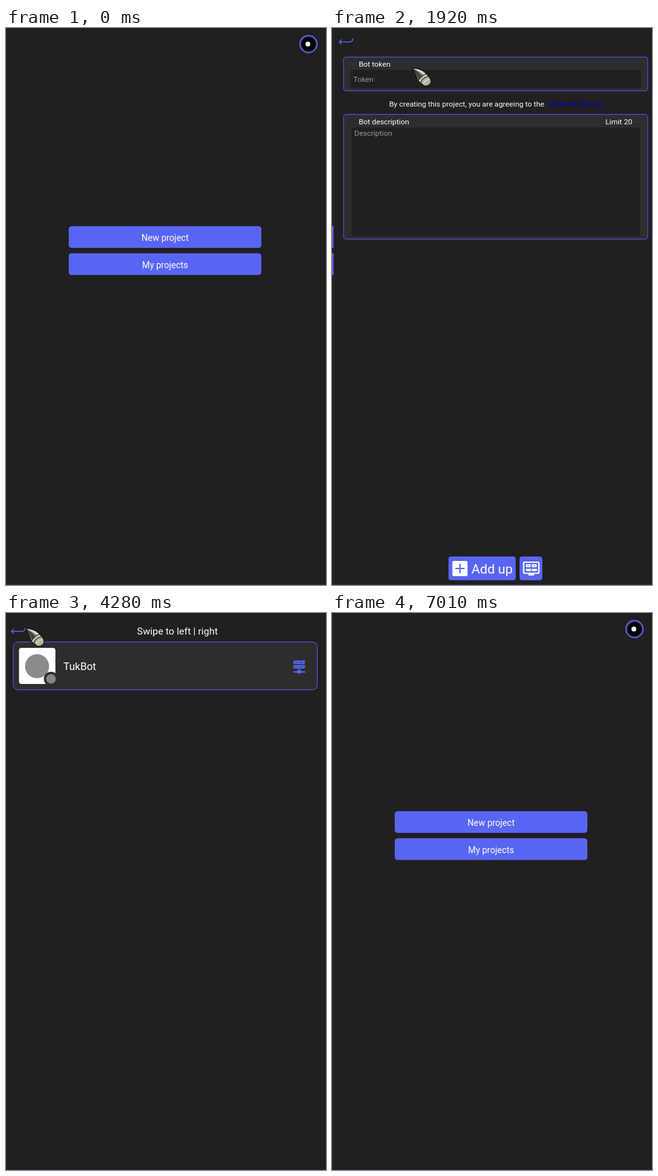
Recreate the animation shown at these times as an HTML page with a canvas. Size 505 by 879 pixels, loop 7270 ms.

```html
<!DOCTYPE html>
<html lang="en">
<head>
<meta charset="utf-8">
<title>Bot projects</title>
<style>
html, body { margin: 0; width: 100%; height: 100%; overflow: hidden; background: #211f20; }
canvas { display: block; width: 505px; height: 879px; }
</style>
</head>
<body>
<canvas id="stage"></canvas>
<script>
const W = 505, H = 879, LOOP = 7270, STEP = 1000 / 15;
const BG = '#211f20', BLUE = '#5865f2', CARD = '#2d2d2d', EDGE = '#4d55cc';
const canvas = document.getElementById('stage');
const ctx = canvas.getContext('2d');
const dpr = window.devicePixelRatio || 1;
canvas.width = W * dpr;
canvas.height = H * dpr;

// time, x, y of the pointer tip
const PATH = [
  [330, 495, 819], [540, 486, 350], [740, 462, 5], [1030, 323, 288],
  [1250, 312, 325], [1510, 312, 325], [1913, 127, 63], [2250, 18, 19],
  [2500, 18, 19], [3110, 236, 357], [3450, 236, 357], [4150, 31, 24],
  [4410, 31, 24], [4540, 17, 26], [4680, 17, 26], [5420, 471, 21],
  [5600, 471, 21], [6040, 479, 40], [6380, 479, 40], [7000, 503, 879]
];

const clamp = v => Math.max(0, Math.min(1, v));
const ramp = (t, start, len) => clamp((t - start) / len);
const smooth = k => k * k * (3 - 2 * k);
const bez = (s, a, b) => 3 * (1 - s) * (1 - s) * s * a + 3 * (1 - s) * s * s * b + s * s * s;

function slideEase(k) {
  if (k <= 0 || k >= 1) return clamp(k);
  let lo = 0, hi = 1;
  for (let i = 0; i < 24; i++) {
    const mid = (lo + hi) / 2;
    if (bez(mid, 0.35, 0.33) < k) lo = mid; else hi = mid;
  }
  return bez(lo, 0.91, 0.97);
}

const shown = (t, open, close) => slideEase(ramp(t, open, 500)) - slideEase(ramp(t, close, 500));
const pressAlpha = (t, down, up) => 1 - 0.8 * (ramp(t, down, 120) - ramp(t, up, 180));

function box(x, y, w, h, r, fill, stroke) {
  ctx.beginPath();
  ctx.roundRect(x, y, w, h, r);
  if (fill) { ctx.fillStyle = fill; ctx.fill(); }
  if (stroke) { ctx.strokeStyle = stroke; ctx.lineWidth = 1.2; ctx.stroke(); }
}

function disc(x, y, r, fill) {
  ctx.beginPath();
  ctx.arc(x, y, r, 0, 7);
  ctx.fillStyle = fill;
  ctx.fill();
}

function text(str, x, y, size, color = '#fff', align = 'left') {
  ctx.font = size + 'px Roboto, sans-serif';
  ctx.textAlign = align;
  ctx.fillStyle = color;
  ctx.fillText(str, x, y);
}

function shape(d, fill) {
  ctx.fillStyle = fill;
  ctx.fill(new Path2D(d));
}

function line(d, color, width) {
  ctx.strokeStyle = color;
  ctx.lineWidth = width;
  ctx.lineCap = ctx.lineJoin = 'round';
  ctx.stroke(new Path2D(d));
}

function at(x, y, draw) {
  ctx.save();
  ctx.translate(x, y);
  draw();
  ctx.restore();
}

function button(label, y, baseline, alpha) {
  ctx.save();
  ctx.globalAlpha *= alpha;
  box(99, y, 304, 34.3, 4.5, BLUE);
  text(label, 251, baseline, 14, '#fff', 'center');
  ctx.restore();
}

function avatar(x, y, ring) {
  disc(x, y, 13.5, ring ? '#1c1b1c' : '#2a2b2d');
  disc(x, y, 10.5, '#000');
  disc(x - 1, y, 3.8, '#f4f4f4');
  if (!ring) return;
  ctx.beginPath();
  ctx.arc(x, y, 13.4, 0, 7);
  ctx.strokeStyle = BLUE;
  ctx.lineWidth = 2;
  ctx.stroke();
}

const backArrow = (x, y) => at(x, y, () =>
  line('M4 -3.5L0.8 0L4 3.5M1 0H16Q22 0 22 -5', BLUE, 1.6));

function home(t, shift) {
  at(-shift, 0, () => {
    button('New project', 312.8, 336, pressAlpha(t, 1250, 1510));
    button('My projects', 355.4, 378.5, pressAlpha(t, 3130, 3360));
    avatar(477.4, 25.4, t < 5440 || t > 6440);
  });
}

function page(x, draw) {
  if (x > W + 2) return;
  at(x, 0, () => {
    ctx.fillStyle = BG;
    ctx.fillRect(-3, 0, W + 3, H);
    if (x > 0.5) {
      ctx.fillStyle = '#302e30';
      ctx.fillRect(-3.5, 0, 1, H);
    }
    draw();
  });
}

function newProject() {
  backArrow(5, 22);
  box(12.4, 45.8, 480, 53.4, 4, CARD, EDGE);
  text('Bot token', 36.3, 61.3, 11.8);
  box(23, 66, 459, 29, 4, BG);
  text('Token', 27.8, 85, 11.8, '#999');
  text('By creating this project, you are agreeing to the', 84.3, 124.3, 11.8);
  text('Terms of Service', 333, 124.3, 11.8, '#0000d8');
  box(12.4, 136.4, 480, 196.8, 4, CARD, EDGE);
  text('Bot description', 36.3, 152, 11.8);
  text('Limit 20', 468, 152, 11.8, '#fff', 'right');
  box(25, 157, 455, 172, 4, BG);
  text('Description', 29.3, 170.2, 11.8, '#999');

  box(178, 834, 106, 37.5, 4, BLUE);
  box(184, 841, 24, 24, 2, '#fff');
  line('M196 846.5V859.5M189.5 853H202.5', BLUE, 2);
  text('Add up', 214, 861, 20.8);
  box(290, 834, 36, 37.5, 4, BLUE);
  ctx.strokeStyle = '#fff';
  ctx.lineWidth = 2.2;
  ctx.beginPath();
  ctx.roundRect(296.5, 843, 24, 17.5, 2);
  ctx.stroke();
  ctx.fillStyle = '#fff';
  ctx.fillRect(304, 861, 9, 3);
  ctx.strokeRect(301, 847, 5.5, 3);
  ctx.strokeRect(310.5, 847, 5.5, 3);
  ctx.fillRect(300, 853.5, 8, 3.5);
  ctx.fillRect(309.5, 853.5, 8, 3.5);
}

function serverIcon() {
  for (const y of [75, 82]) {
    box(453.8, y, 17.8, 5.6, 0.5, BLUE);
    for (const x of [456, 459]) disc(x, y + 2.8, 0.8, CARD);
    ctx.fillStyle = CARD;
    ctx.fillRect(462, y + 2.4, 7, 0.8);
  }
  line('M462.7 88V92M454 93H471.5', BLUE, 1.8);
  box(459.5, 90.2, 6.5, 5, 1, BLUE);
}

function projectList(t) {
  backArrow(8, 29);
  text('Swipe to left | right', 270.5, 34, 15.4, '#fff', 'center');
  if (t < 3700) return;
  box(11.4, 45.6, 480, 75.6, 8, CARD, EDGE);
  box(20.5, 55, 57.5, 57, 4, '#fff');
  disc(49, 84, 19, '#8b8b8b');
  disc(71, 104, 11.3, CARD);
  disc(71, 104, 7.6, '#858585');
  text('TukBot', 90.6, 90, 16.5);
  serverIcon();
}

const ICONS = {
  support() {
    line('M-6 3V0A6 6 0 0 1 6 0V3M6 3Q6 6 1 6', BLUE, 1.4);
    line('M-3.3 0Q0 0 1 -3Q2 -1 4 0', BLUE, 1.3);
    line('M-6 1V4M6 1V4', BLUE, 2.2);
  },
  shop() {
    shape('M-6 -7H6L8 -1Q6 2 4 0Q2 2 0 0Q-2 2 -4 0Q-6 2 -8 -1Z', BLUE);
    shape('M-6.5 2H6.5V7H-6.5Z', BLUE);
    shape('M-4 2H1V5H-4Z', '#35383a');
    line('M-3 -6L-4 -1M0 -6V-1M3 -6L4 -1', '#35383a', 0.8);
  },
  privacy() {
    shape('M0 -8L6.5 -5.5V0Q6 6 0 8Q-6 6 -6.5 0V-5.5Z', BLUE);
    line('M0 -0.5V4M0 -3.4V-3.3', '#35383a', 1.6);
  },
  settings() {
    ctx.beginPath();
    for (let i = 0; i <= 64; i++) {
      const a = i / 64 * Math.PI * 2;
      const r = 7 + 1.4 * Math.max(-1, Math.min(1, 2 * Math.cos(8 * a)));
      ctx.lineTo(r * Math.sin(a), -r * Math.cos(a));
    }
    ctx.strokeStyle = BLUE;
    ctx.lineWidth = 1.4;
    ctx.stroke();
    ctx.beginPath();
    ctx.arc(0, 0, 2.8, 0, 7);
    ctx.stroke();
  },
  logout() {
    line('M2.5 -4V-7H-5.5V7H2.5V4', BLUE, 1.5);
    shape('M-2 -1.5H3V-4L7.5 0L3 4V1.5H-2Z', BLUE);
  }
};

const MENU = [
  ['Support', 94, 'support'], ['Shop', 124, 'shop'], ['Privacy & Term', 153.5, 'privacy'],
  ['Settings', 183.5, 'settings'], ['Log Out', 224, 'logout']
];

function menu(t) {
  const k = smooth(ramp(t, 5430, 140)) - smooth(ramp(t, 6350, 170));
  if (k <= 0) return;
  ctx.save();
  ctx.globalAlpha = k;
  ctx.translate(492, 40);
  ctx.scale(0.8 + 0.2 * k, 0.8 + 0.2 * k);
  ctx.translate(-492, -40);
  ctx.shadowColor = 'rgba(0,0,0,.35)';
  ctx.shadowBlur = 5 * dpr;
  box(346, 40, 145.5, 206.5, 6, '#242728');
  ctx.shadowColor = 'transparent';
  avatar(369.4, 63.8, true);
  text('tovilen', 391.6, 69, 14);
  for (const [label, y, icon] of MENU) {
    disc(368.6, y - 0.3, 13.2, '#35383a');
    at(368.6, y - 0.3, ICONS[icon]);
    text(label, 389.6, y + 5.5, 14);
  }
  ctx.fillStyle = '#484b4d';
  ctx.fillRect(384, 202.3, 70, 1.3);
  ctx.restore();
}

function pointer(t) {
  if (t < 313 || t >= 7000) return;
  let i = 1;
  while (i < PATH.length - 1 && t >= PATH[i][0]) i++;
  const [t0, x0, y0] = PATH[i - 1], [t1, x1, y1] = PATH[i];
  const k = smooth(ramp(t, t0, t1 - t0));
  at(x0 + (x1 - x0) * k, y0 + (y1 - y0) * k, () => {
    const body = 'M0 0Q15 1 21 8Q29 16 29.5 22Q28 29 19 28.5L9 21Q6 12 0 0Z';
    shape(body, '#aeb39b');
    shape('M0 0Q15 1 22 9L9 20Q6 12 0 0Z', '#85877f');
    shape('M1 1Q14 2 21 8L18 11Q10 5 1 1Z', '#d5d8cb');
    shape('M1 1Q11 7 15 13L10 18Q6 10 1 1Z', '#43463f');
    shape('M9 20L21 9L24 13Q14 16 13 24Z', '#c9ccc0');
    line('M9.5 20Q14 12 22 9.5M13 23Q15 16 24 13.5', '#20221e', 1.2);
    line('M17 26Q19 19 27 18', '#dce0cd', 1.4);
    line(body, '#11120f', 1.3);
  });
}

function draw(now) {
  const raw = now % LOOP;
  const t = Math.max(0, Math.floor((raw + 20) / STEP) * STEP - 20);
  const a = shown(t, 1510, 2470), b = shown(t, 3314, 4620);
  ctx.setTransform(dpr, 0, 0, dpr, 0, 0);
  ctx.fillStyle = BG;
  ctx.fillRect(0, 0, W, H);
  home(t, 152 * (a + b));
  if (a > 0) page(W * (1 - a), newProject);
  if (b > 0) page(W * (1 - b), () => projectList(t));
  menu(t);
  pointer(t);
  ctx.fillStyle = '#1d1c38';
  ctx.fillRect(504, 0, 1, H);
  ctx.fillStyle = '#2b2e62';
  ctx.fillRect(0, 878, W, 1);
}

const start = performance.now();
function tick() {
  draw(performance.now() - start);
  requestAnimationFrame(tick);
}
tick();
</script>
</body>
</html>
```
